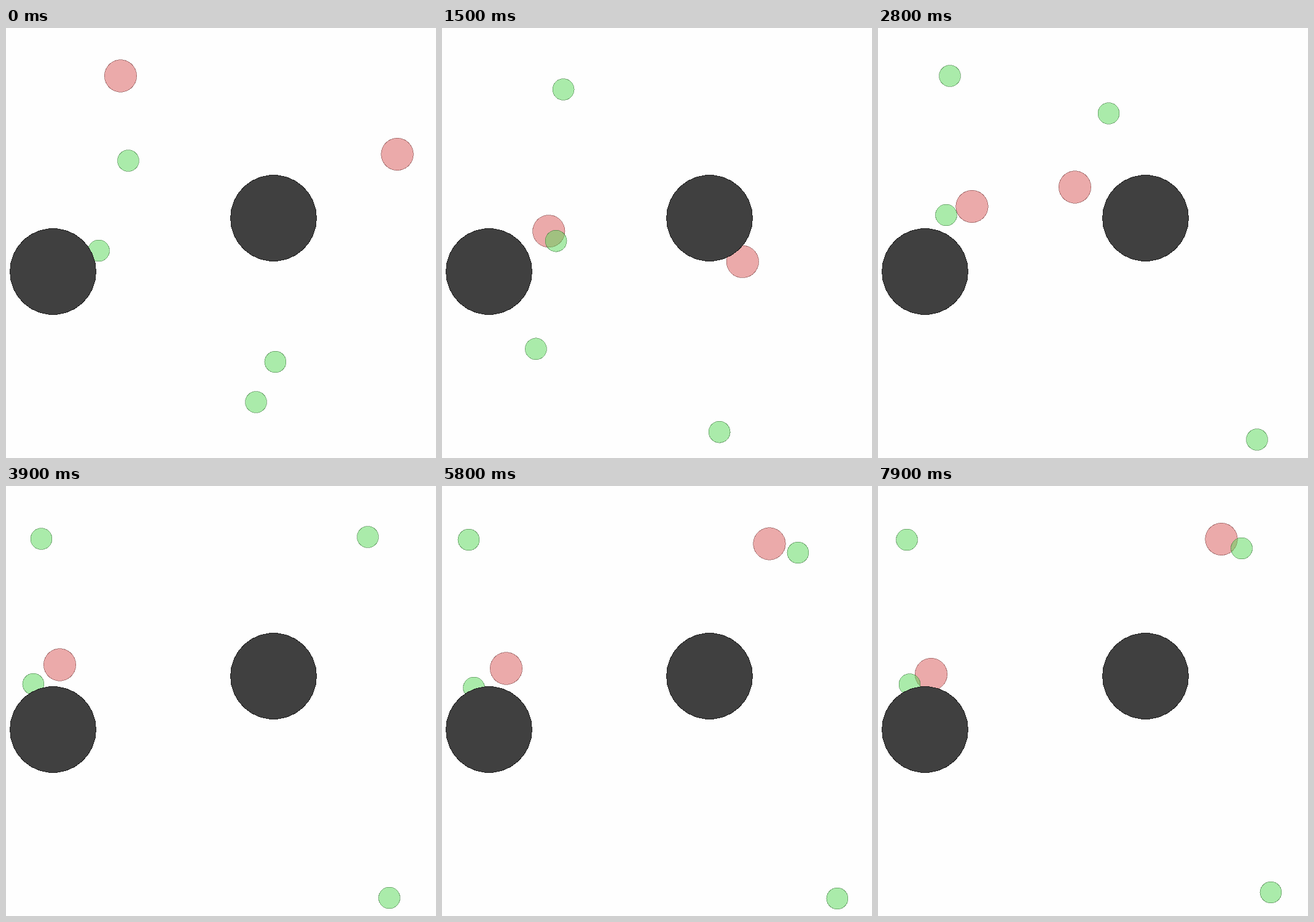
Recreate the animation shown at these times as an HTML page. Size 700 by 700 pixels, loop 8 s.

```html
<!DOCTYPE html>
<html lang="en">
<head>
<meta charset="utf-8">
<title>Pursuit</title>
<style>
  html, body { margin: 0; width: 100%; height: 100%; overflow: hidden; background: #fefefe; }
  svg { display: block; width: 100%; height: 100%; }
</style>
</head>
<body>
<svg id="stage" viewBox="0 0 700 700"></svg>
<script>
const LOOP = 8000, STEP = 100;
const BEATS = [0, 9, 20, 28, 39, 58, 79]; // in steps, shared by all agents
const CLEARANCE = 89; // closest a chaser's centre gets to an obstacle's centre
const stage = document.getElementById('stage');

// A disc drawn as a regular polygon with 30 corners.
function disc(r, fill, stroke, alpha) {
  const el = document.createElementNS('http://www.w3.org/2000/svg', 'polygon');
  const points = Array.from({ length: 30 }, (_, i) => {
    const angle = i * Math.PI / 15;
    return `${r * Math.cos(angle)},${r * Math.sin(angle)}`;
  }).join(' ');
  const attrs = { points, fill, stroke, 'fill-opacity': alpha, 'stroke-opacity': alpha, 'shape-rendering': 'crispEdges' };
  for (const name in attrs) el.setAttribute(name, attrs[name]);
  return stage.appendChild(el);
}

const place = (el, [x, y]) => el.setAttribute('transform', `translate(${x} ${y})`);

const chaser = (...path) => ({ el: disc(26.25, '#d95959', '#6c2d2d', 0.5), path, blocked: true });
const runner = (...path) => ({ el: disc(17.5, '#59d959', '#2d6c2d', 0.5), path });

// One waypoint per beat.
const agents = [
  chaser([186.5, 78], [192, 351], [157.5, 308], [153, 290.5], [87.5, 291], [104.5, 297], [86.5, 306.5]),
  chaser([637, 205.5], [517, 264], [425, 399], [320.5, 259], [465, -45], [533, 94], [559, 86.5]),
  runner([199, 216], [153, 161], [231.5, 69], [117, 78], [57.5, 86], [43.5, 87.5], [47, 87.5]),
  runner([151, 362.5], [132.5, 620.5], [191, 381.5], [375.5, 139], [589, 83], [579.5, 108.5], [592, 101.5]),
  runner([438.5, 543.5], [329, 475.5], [109.5, 272], [111, 304.5], [44.5, 322.5], [52, 328.5], [51.5, 323]),
  runner([407, 609], [302, 636], [584, 668.5], [617, 670], [624, 670.5], [643.5, 671.5], [639.5, 661.5])
];

const obstacles = [[76.5, 396.5], [435.5, 309.5]];
for (const at of obstacles) place(disc(70, '#404040', '#202020', 1), at);

// Average speed from beat i to the next; at rest outside the path.
function slope(path, i, axis) {
  if (i < 0 || i >= path.length - 1) return 0;
  return (path[i + 1][axis] - path[i][axis]) / (BEATS[i + 1] - BEATS[i]);
}

// Harmonic mean of neighbouring slopes: agents stop where they turn back and never overshoot.
function velocity(path, i, axis) {
  const before = slope(path, i - 1, axis), after = slope(path, i, axis);
  return before * after > 0 ? 2 * before * after / (before + after) : 0;
}

function positionAt(path, t) {
  const i = BEATS.findLastIndex((beat, k) => beat <= t && k < BEATS.length - 1);
  const span = BEATS[i + 1] - BEATS[i];
  const u = (t - BEATS[i]) / span, v = 1 - u;
  return [0, 1].map(axis =>
    v * v * (1 + 2 * u) * path[i][axis] + u * u * (3 - 2 * u) * path[i + 1][axis] +
    span * u * v * (v * velocity(path, i, axis) - u * velocity(path, i + 1, axis)));
}

function pushOut([x, y], [ox, oy]) {
  const dx = x - ox, dy = y - oy;
  const scale = Math.max(1, CLEARANCE / Math.hypot(dx, dy));
  return [ox + dx * scale, oy + dy * scale];
}

function draw(ms) {
  const t = Math.floor((ms % LOOP) / STEP);
  for (const { el, path, blocked } of agents) {
    const at = positionAt(path, t);
    place(el, blocked ? obstacles.reduce(pushOut, at) : at);
  }
}

const start = performance.now();
function tick() {
  draw(performance.now() - start);
  requestAnimationFrame(tick);
}
tick();
</script>
</body>
</html>
```
